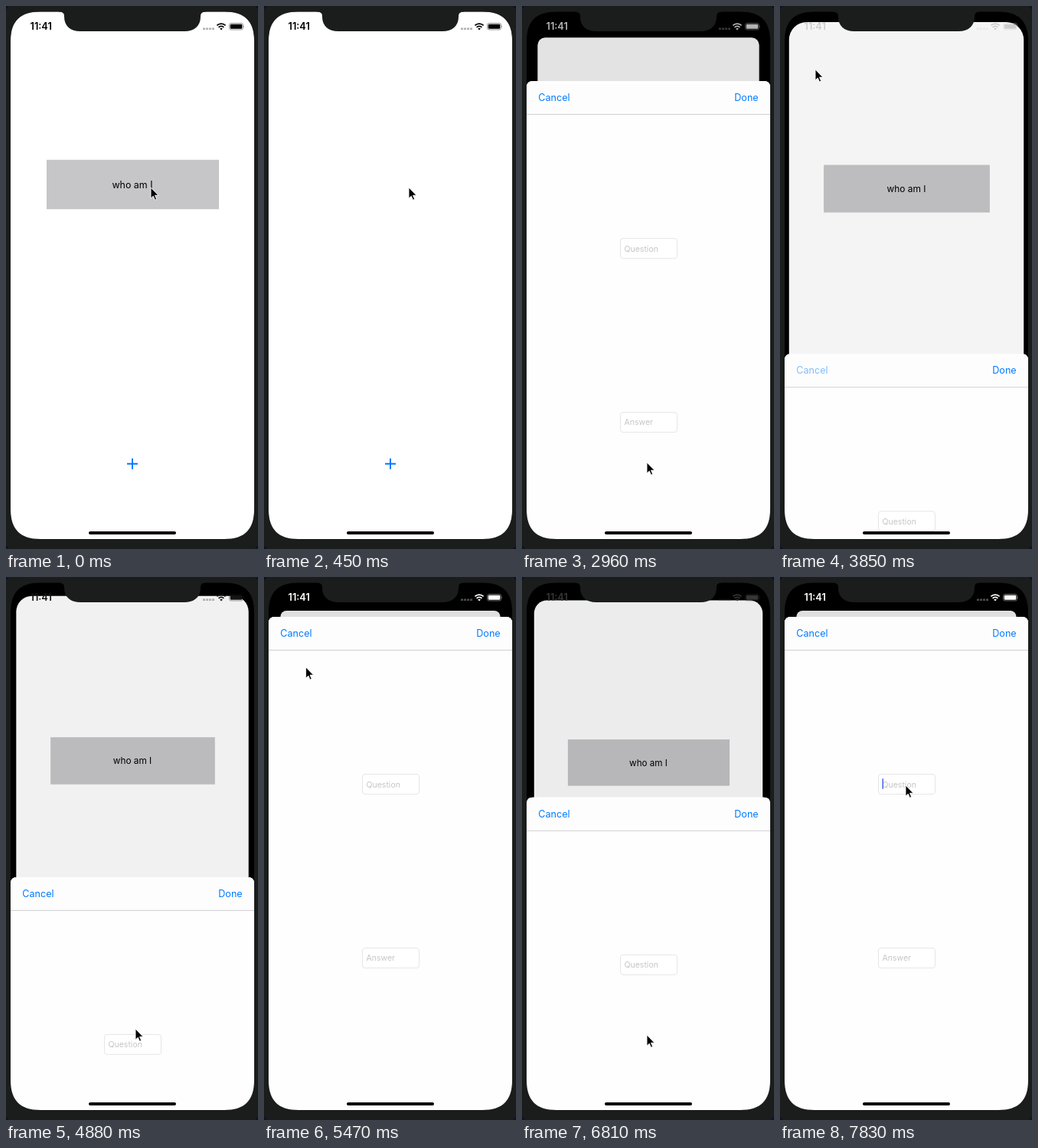
Write an HTML page that moves like this. It is 329x709 px and loops after 8000 ms.

```html
<!DOCTYPE html>
<html lang="en">
<head>
<meta charset="utf-8">
<title>Flashcards</title>
<style>
  html, body { margin: 0; width: 100%; height: 100%; overflow: hidden; background: #0b1326; }
  svg { display: block; width: 329px; height: 709px; }
  text { font-family: Inter, Roboto, sans-serif; font-size: 12.6px; }
  .time { font-size: 12.8px; font-weight: 600; }
  .link { fill: #007aff; }
  .hint { font-size: 10.5px; fill: #c5c5c7; }
  .field { fill: #fff; stroke: #e6e6e6; }
</style>
</head>
<body>
<svg viewBox="0 0 329 709">
  <defs>
    <clipPath id="screen">
      <path d="M6 46C6 19.5 18.5 7.5 45 7.5H285C311.500 7.500 324 19.500 324 46V657C324 683.500 311.500 696 285 696H45C18.500 696 6 683.500 6 657Z"/>
    </clipPath>
  </defs>

  <rect x="-6" y="-6" width="341" height="721" rx="28" fill="#1b1d1d"/>

  <g clip-path="url(#screen)">
    <rect width="329" height="709"/>
    <g id="home">
      <rect class="page" width="318" height="689" fill="#fff"/>
      <g id="card">
        <rect x="47" y="193.500" width="225" height="64.500" fill="#c6c6c8"/>
        <text x="159" y="230.300" text-anchor="middle" style="font-size:12.4px">who am I</text>
      </g>
      <path d="M152 590.500h14M159 583.500v14" stroke="#007aff" stroke-width="2"/>
      <rect id="dim" class="page" width="318" height="689"/>
    </g>

    <g id="sheet">
      <path d="M0 700V8Q0 0 8 0H310Q318 0 318 8V700Z" fill="#fefefe"/>
      <path d="M0 43V8Q0 0 8 0H310Q318 0 318 8V43Z" fill="#fdfdfd"/>
      <path d="M0 43.500H318" stroke="#d0d0d2"/>
      <text id="cancel" class="link" x="15.300" y="26.200">Cancel</text>
      <text class="link" x="302.700" y="26.200" text-anchor="end">Done</text>
      <rect class="field" x="122.500" y="205.500" width="74" height="26" rx="3.500"/>
      <text class="hint" x="127.500" y="222.500">Question</text>
      <rect class="field" x="122.500" y="432.500" width="74" height="26" rx="3.500"/>
      <text class="hint" x="127.500" y="449.300">Answer</text>
      <rect id="caret" x="127.500" y="211" width="1.500" height="14" rx=".7" fill="#4668e8"/>
    </g>

    <g id="status">
      <text class="time" x="45.700" y="31.300" text-anchor="middle">11:41</text>
      <path d="M257 29.800h3m1 0h3m1 0h3m1 0h3" stroke="currentColor" stroke-width="2.600" opacity=".3"/>
      <g fill="none" stroke="currentColor" stroke-width="1.700">
        <path d="M275.400 25.400a7.800 7.800 0 0 1 11.200 0M277.600 27.800a4.800 4.800 0 0 1 6.800 0"/>
      </g>
      <path d="M279.200 29.400q1.800-1.500 3.600 0l-1.800 2z"/>
      <rect x="291.500" y="22.500" width="18" height="8.500" rx="2.400" fill="none" stroke="currentColor" opacity=".4"/>
      <rect x="292.700" y="23.700" width="15.600" height="6.100" rx="1.400"/>
      <path d="M310.500 25.300q1.300 1.400 0 3z" opacity=".5"/>
    </g>
    <rect x="108" y="686" width="114" height="4" rx="2"/>
  </g>

  <path d="M69 6.500V7.500Q76 7.500 76 13V14C76 26 84 33 97 33H233C246 33 254 26 254 14V13Q254 7.500 261 7.500V6.500Z" fill="#1b1d1d"/>

  <path id="pointer" d="M0 0V14.200L3.300 11.200L5.500 16.300L7.700 15.300L5.500 10.300H10Z" stroke="#fff" stroke-width=".9" stroke-linejoin="round"/>
</svg>

<script>
const LOOP = 8000, LIVE = 1790, STEP = 147.4;
const REST = 52, BOTTOM = 696;

// [time, sheet open]
const taps = [[2730, 1], [3736, 0], [4797, 1], [5695, 0], [6682, 1]];

// pointer tip: [time, x, y]
const path = [
  [1800, 189, 237], [2450, 164, 611], [2680, 163, 596], [3080, 163, 596],
  [3620, 44, 74], [3800, 44, 74], [4500, 166, 600], [4720, 169, 590],
  [5040, 169, 590], [5570, 44, 74], [5700, 48, 84], [5917, 139, 487],
  [6500, 163, 614], [6670, 163, 598], [6860, 163, 598], [7520, 163, 271],
  [7660, 164, 272]
];

const $ = id => document.getElementById(id);
const [home, card, dim, sheet, cancel, caret, status, pointer] =
  ["home", "card", "dim", "sheet", "cancel", "caret", "status", "pointer"].map($);
const pages = document.querySelectorAll(".page");

const clamp = v => Math.max(0, Math.min(1, v));
const mix = (a, b, k) => a + (b - a) * k;
const place = (el, x, y, s = 1) =>
  el.setAttribute("transform", `translate(${x.toFixed(2)} ${y.toFixed(2)}) scale(${s.toFixed(4)})`);

function tick(t) {
  if (t < LIVE - 11) return t;
  return LIVE + STEP * Math.floor((t - LIVE + 11) / STEP);
}

// Critically damped spring, age in seconds.
function spring(age) {
  const x = 18 * age;
  return age > 0.6 ? 1 : 1 - (1 + x) * Math.exp(-x);
}

function pointerAt(t) {
  const i = path.findIndex(k => k[0] > t);
  if (i === 0) return path[0].slice(1);
  if (i < 0) return path[path.length - 1].slice(1);
  const [t0, x0, y0] = path[i - 1], [t1, x1, y1] = path[i];
  const k = (t - t0) / (t1 - t0), e = k * k * (3 - 2 * k);
  return [mix(x0, x1, e), mix(y0, y1, e)];
}

function draw(now) {
  const t = tick(now);
  const [start, open] = taps.filter(k => k[0] <= t).pop() || [-LOOP, 0];
  const age = (t - start) / 1000;
  const k = spring(age), p = open ? k : 1 - k;

  const scale = 1 - 0.0975 * p;
  place(home, mix(6, 21.5, p), mix(7.3, 44, p), scale);
  pages.forEach(r => r.setAttribute("rx", mix(32, 8, p) / scale));
  dim.setAttribute("opacity", 0.12 * p);
  card.setAttribute("visibility", now >= 450 && now < LIVE - 11 ? "hidden" : "visible");

  place(sheet, 6, mix(BOTTOM, REST, p));
  sheet.setAttribute("visibility", p > 0 ? "visible" : "hidden");
  cancel.setAttribute("opacity", open ? 1 : clamp(0.2 + 2.5 * age));
  caret.setAttribute("opacity", t >= 7680 ? 1 : 0);

  const fade = clamp((age - 0.07) / 0.24);
  const level = Math.round(255 * (open ? fade : 1 - fade));
  const tone = `rgb(${level},${level},${level})`;
  status.setAttribute("fill", tone);
  status.setAttribute("color", tone);

  place(pointer, ...pointerAt(t));
}

const begin = performance.now();
function frame() {
  draw((performance.now() - begin) % LOOP);
  requestAnimationFrame(frame);
}
frame();
</script>
</body>
</html>
```
